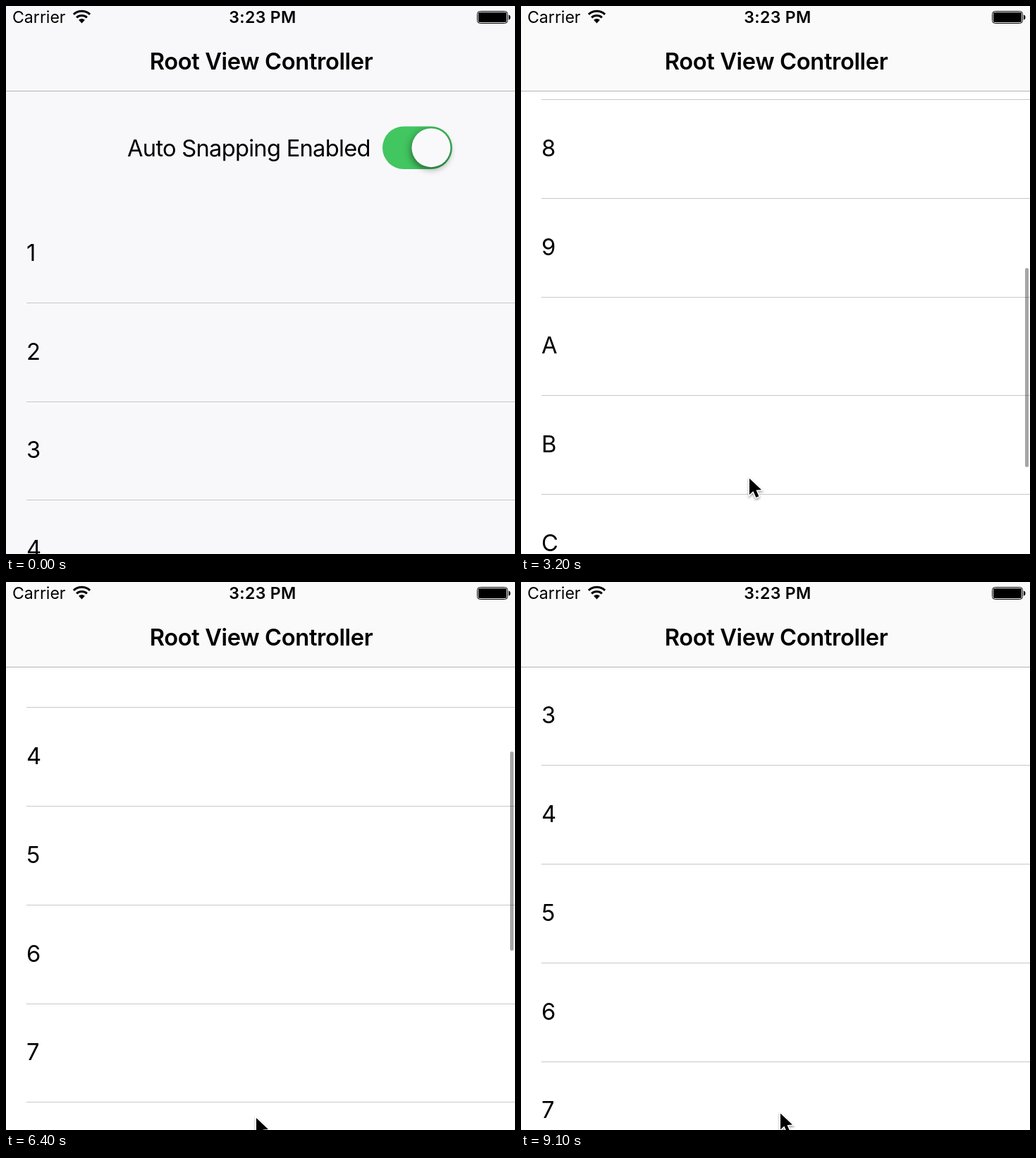
These frames come from a looping animation (722 by 776 pixels, 9.2 s). An HTML page:

```html
<!DOCTYPE html>
<html lang="en">
<head>
<meta charset="utf-8">
<title>Snapping list</title>
<style>
  html, body { margin: 0; width: 100%; height: 100%; overflow: hidden; background: #fff; }
  svg { display: block; width: 722px; height: 776px; }
  text { font: 400 32.7px Inter, Roboto, sans-serif; letter-spacing: -.023em; fill: #000; }
  .status { font-size: 23.1px; letter-spacing: 0; }
  .bold { font-weight: 600; text-anchor: middle; letter-spacing: -.012em; }
  .clock { letter-spacing: .3px; }
  .knob { filter: drop-shadow(0 4px 4px rgba(0, 0, 0, .32)); }
  #cursor { filter: drop-shadow(0 2px 1.5px rgba(0, 0, 0, .35)); }
</style>
</head>
<body>
<svg viewBox="0 0 722 776">
  <rect id="page" width="722" height="776"/>

  <g id="list">
    <text x="172" y="213">Auto Snapping Enabled</text>
    <clipPath id="track"><rect x="534" y="170.5" width="99" height="60.5" rx="30.25"/></clipPath>
    <rect x="534" y="170.5" width="99" height="60.5" rx="30.25" fill="#42c660"/>
    <g clip-path="url(#track)">
      <circle cx="603" cy="203" r="30" fill="#000" opacity=".18" style="filter: blur(6px)"/>
    </g>
    <circle class="knob" cx="603" cy="200.7" r="27.5" fill="#f9f9fb"/>
    <g id="rows"></g>
  </g>

  <rect id="bar" x="715" width="5" height="282" rx="2.5" fill="#000"/>

  <rect id="nav" width="722" height="120"/>
  <rect y="120" width="722" height="1" fill="#b4b4b6"/>
  <text class="status" x="9" y="24.4">Carrier</text>
  <g fill="none" stroke="#000" stroke-width="3">
    <path d="M95.9 11.9A17 17 0 0 1 119.1 11.9"/>
    <path d="M100.1 16.3A11 11 0 0 1 114.9 16.3"/>
    <path d="M107.5 24.5L103.1 19.7A6.5 6.5 0 0 1 111.9 19.7Z" fill="#000" stroke="none"/>
  </g>
  <text class="status bold clock" x="364" y="24.4">3:23 PM</text>
  <rect x="668.5" y="7.5" width="43" height="17" rx="4" fill="none" stroke="#000"/>
  <rect x="670" y="9" width="40" height="14" rx="2"/>
  <path d="M713 12.5Q715.5 13 715.5 16T713 19.5Z"/>
  <text class="bold" x="362" y="89.5">Root View Controller</text>

  <g id="cursor">
    <path d="M0 0V23L5.4 18 9.4 27 13.4 25.3 9.5 16.5 17 16Z" fill="#000" stroke="#fff" stroke-width="3" paint-order="stroke"/>
  </g>
</svg>
<script>
const LOOP = 9200, STEP = 100, ROW = 139.7;
const $ = id => document.getElementById(id);
const place = (el, x, y) => el.setAttribute('transform', `translate(${x} ${y})`);

$('rows').innerHTML = [...'123456789ABCD'].map((label, i) => {
  const line = Math.round(420 + i * ROW);
  return `<text x="29" y="${line - 59}">${label}</text>
    <rect x="29" y="${line}" width="693" height="1" fill="#c8c7cc"/>`;
}).join('');

// Each swipe accelerates with the finger, then coasts to a row edge.
const swipes = [
  { start: 708, release: 820, stop: 3900, from: 0, drag: 100, to: 1138, tau: 585, hide: 4000 },
  { start: 4600, release: 5066, stop: 8100, from: 1138, drag: -168, to: 440, tau: 750, hide: 8300 }
];

function swipeOffset(s, t) {
  if (t < s.release) return s.from + s.drag * ((t - s.start) / (s.release - s.start)) ** 2;
  if (t >= s.stop) return s.to;
  const end = Math.exp((s.release - s.stop) / s.tau);
  const left = (Math.exp((s.release - t) / s.tau) - end) / (1 - end);
  return s.to + (s.from + s.drag - s.to) * left;
}

// time, x, y of the pointer tip
const path = [
  [0, 365, 790], [100, 358, 768], [350, 335, 705], [708, 325, 771], [820, 324, 671],
  [1400, 324, 671], [2300, 324, 669], [4300, 324, 669], [4400, 334, 653],
  [4600, 343, 591], [5066, 355, 759], [8800, 355, 759], [9100, 368, 752.5], [LOOP, 368, 752.5]
];

function pointer(t) {
  const i = path.findIndex(p => p[0] > t);
  const [a, b] = [path[i - 1], path[i]];
  let k = (t - a[0]) / (b[0] - a[0]);
  if (swipes.some(s => s.start === a[0])) k *= k;
  return [1, 2].map(n => a[n] + (b[n] - a[n]) * k);
}

function draw(now) {
  const t = Math.floor((now % LOOP) / STEP) * STEP;
  const swipe = swipes.filter(s => t >= s.start).pop();
  const scroll = swipe ? swipeOffset(swipe, t) : 0;
  const shown = !swipe || t > swipe.hide ? 0 : t === swipe.hide ? .5 : 1;

  $('page').setAttribute('fill', t ? '#fff' : '#f8f8fb');
  $('nav').setAttribute('fill', t ? '#fafafa' : '#f8f8fb');
  place($('list'), 0, -Math.round(scroll));
  $('bar').setAttribute('y', Math.round(127 + scroll * .2168));
  $('bar').setAttribute('opacity', .35 * shown);
  place($('cursor'), ...pointer(t));
}

function tick() {
  draw(performance.now());
  requestAnimationFrame(tick);
}
tick();
</script>
</body>
</html>
```
